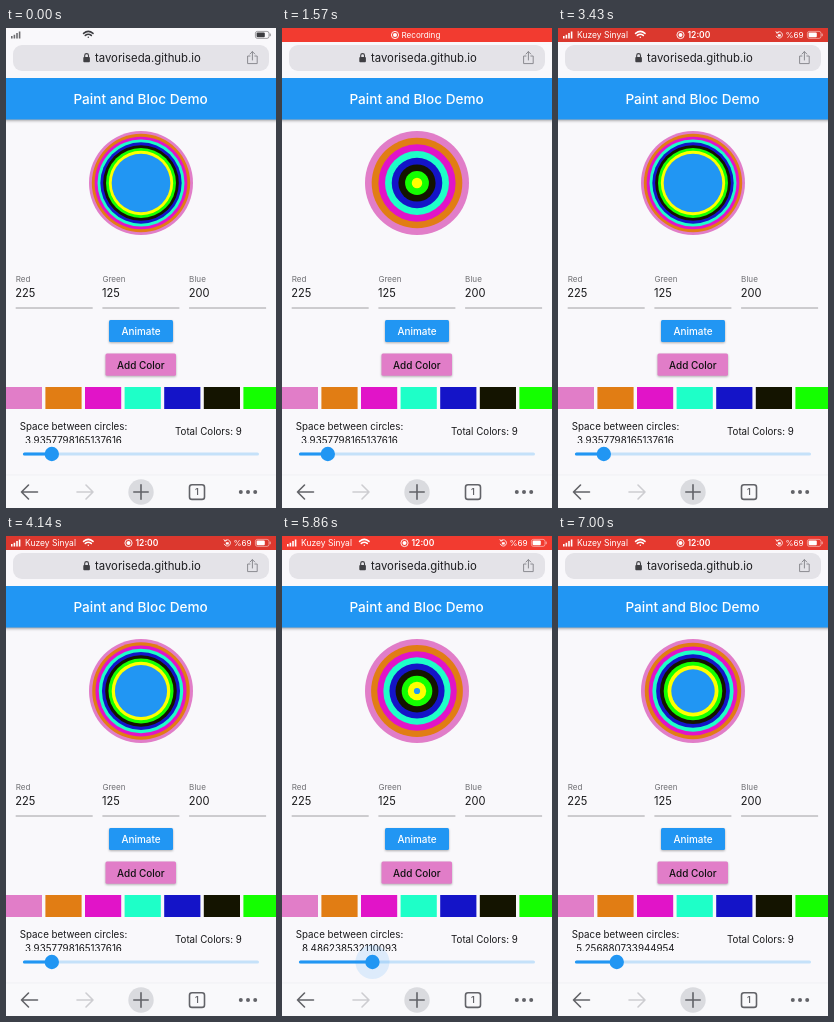
An HTML page that plays this animation: 270x480 px, repeating every 7.14 s.

```html
<!DOCTYPE html>
<html lang="en">
<head>
<meta charset="utf-8">
<title>Paint and Bloc Demo</title>
<style>
  html, body { margin: 0; width: 100%; height: 100%; overflow: hidden; background: #f9f8fb; }
  svg { display: block; width: 100%; height: 100%; font-family: Inter, Roboto, sans-serif; }
  .mid { text-anchor: middle; }
  .bold { font-weight: 500; }
  .line { fill: none; stroke-linecap: round; stroke-linejoin: round; }
  .raised { filter: drop-shadow(0 1px 1px rgba(0, 0, 0, .3)); }
</style>
</head>
<body>
<svg viewBox="0 0 270 480">
  <defs>
    <clipPath id="valueClip"><rect y="400" width="135" height="15"/></clipPath>
    <g id="wifi" class="line" stroke="currentColor" stroke-width="1.6" stroke-linecap="butt">
      <path d="M77.6 5.4Q82.3 1.5 87 5.4M79.3 7.4Q82.3 5 85.3 7.4"/>
      <circle cx="82.3" cy="9.3" r=".7" fill="currentColor" stroke="none"/>
    </g>
    <g id="battery">
      <rect x="249.4" y="3.4" width="13.6" height="7" rx="2" fill="none" stroke="currentColor" stroke-width=".8" opacity=".6"/>
      <rect x="250.6" y="4.6" width="8.2" height="4.6" rx="1" fill="currentColor"/>
      <path d="M264.2 5.6v2.6" stroke="currentColor" opacity=".6"/>
    </g>
    <g id="signal" fill="currentColor">
      <path d="M5 8h1.6v2.6H5zM7.6 6.7h1.6v3.9H7.6z"/>
      <path id="weakBars" d="M10.2 5.1h1.6v5.5h-1.6zM12.8 3.5h1.6v7.1h-1.6z"/>
    </g>
    <g id="record">
      <circle r="3.6" fill="none" stroke="#fff" stroke-width=".9"/>
      <circle r="2" fill="#fff"/>
    </g>
  </defs>

  <rect width="270" height="480" fill="#f9f8fb"/>

  <!-- Status bar -->
  <rect id="statusRed" width="270" height="14"/>
  <g id="statusPlain" color="#3c3c40">
    <use href="#signal" opacity=".75"/><use href="#wifi"/><use href="#battery"/>
  </g>
  <g id="statusRecording" fill="#fff">
    <use href="#record" x="113" y="7"/>
    <text x="119.5" y="10" font-size="8.1">Recording</text>
  </g>
  <g id="statusFull" color="#fff" fill="#fff" font-size="8.5">
    <use href="#signal"/><use href="#wifi"/><use href="#battery"/>
    <text x="19" y="10.2">Kuzey Sinyal</text>
    <use href="#record" x="122.5" y="7"/>
    <text x="129.5" y="10.2" font-weight="600">12:00</text>
    <path class="line" d="M219 4.6a3.2 3.2 0 1 1-.7 3.6M218 3.6l.8 1.6 1.6-.6" stroke="#fff" stroke-width=".8"/>
    <rect x="219.8" y="6.2" width="3" height="2.4" rx=".4"/>
    <text x="227.5" y="10.2" font-size="8.2">%69</text>
  </g>

  <!-- Address bar -->
  <rect x="7" y="17" width="256" height="26" rx="9" fill="#e4e3e8"/>
  <rect x="77.3" y="29" width="6.6" height="5.2" rx=".9" fill="#3f3f43"/>
  <path class="line" d="M78.7 29v-1.5a1.9 1.9 0 0 1 3.8 0V29" stroke="#3f3f43" stroke-width="1.1"/>
  <text x="89" y="34" font-size="11.35" fill="#1d1d20">tavoriseda.github.io</text>
  <path class="line" d="M244 28h-2.4v7.6h9.6V28h-2.4M246.4 32v-8.4M244 26l2.4-2.4 2.4 2.4" stroke="#8a8a90" stroke-width="1"/>

  <!-- App bar -->
  <rect x="-4" y="50" width="278" height="41.5" fill="#2196f3" style="filter:drop-shadow(0 1.5px 1.6px rgba(0,0,0,.4))"/>
  <rect y="46" width="270" height="4" fill="#f9f8fb"/>
  <text class="mid bold" x="134.6" y="76" font-size="13.6" fill="#fff">Paint and Bloc Demo</text>

  <g id="rings"></g>
  <g id="fields"></g>

  <!-- Buttons -->
  <g class="mid bold" font-size="9.95">
    <rect class="raised" x="103" y="292" width="64" height="22" rx="1.5" fill="#2196f3"/>
    <text x="135" y="306.7" fill="#fff">Animate</text>
    <rect class="raised" x="99.5" y="325.5" width="70.5" height="22.3" rx="1.5" fill="#e17dc8"/>
    <text x="134.8" y="340.5" fill="#111">Add Color</text>
  </g>

  <g id="swatches"></g>

  <!-- Spacing slider -->
  <g font-size="9.75" fill="#18181a">
    <text class="mid" x="67.5" y="402">Space between circles:</text>
    <g clip-path="url(#valueClip)"><text id="value" class="mid" x="67.5" y="415.8"></text></g>
    <text x="169" y="407.3">Total Colors: 9</text>
  </g>
  <path class="line" d="M18.5 426H251.5" stroke="#c5e1f9" stroke-width="3"/>
  <path id="active" class="line" stroke="#2196f3" stroke-width="3.2"/>
  <circle id="halo" cy="426" r="17" fill="#2196f3"/>
  <circle id="thumb" cy="426" r="7.2" fill="#2196f3"/>

  <!-- Browser toolbar -->
  <rect y="447" width="270" height="33" fill="#f9f9fb"/>
  <path d="M0 447H270" stroke="#ededf0" stroke-width=".7"/>
  <g class="line" stroke="#626368" stroke-width="1.6">
    <path d="M31.5 464H15.5M22.5 457l-7 7 7 7"/>
    <path d="M71 464H87M80 457l7 7-7 7" stroke="#cdcdd1"/>
    <circle cx="135" cy="464" r="12.7" fill="#dadbdf" stroke="none"/>
    <path d="M127.8 464h14.4M135 456.8v14.4"/>
    <rect x="183.5" y="456.8" width="15" height="14.6" rx="2.5"/>
  </g>
  <text class="mid" x="191" y="467.4" font-size="9" font-weight="600" fill="#626368">1</text>
  <g fill="#626368">
    <circle cx="234.8" cy="464" r="2"/><circle cx="242" cy="464" r="2"/><circle cx="249.2" cy="464" r="2"/>
  </g>
</svg>

<script>
const LOOP = 7140, FRAME = LOOP / 50;
const SCALE = 0.72;                    // stage pixels per app pixel
const TRACK = 327, MIN = 1, MAX = 25;  // slider length and range
const COLORS = ['#e17dc8', '#e17d14', '#e114c8', '#1effc8', '#1414c8', '#141400', '#14ff00', '#ffff00', '#2196f3'];
const $ = id => document.getElementById(id);

function add(parent, tag, attrs, text = '') {
  const node = document.createElementNS('http://www.w3.org/2000/svg', tag);
  for (const key in attrs) node.setAttribute(key, attrs[key]);
  node.textContent = text;
  return $(parent).appendChild(node);
}

const rings = COLORS.map(fill => add('rings', 'circle', { cx: 135, cy: 155, fill }));

COLORS.slice(0, 7).forEach((fill, i) =>
  add('swatches', 'rect', { x: i * 39.6 - 0.2, y: 359, width: 36.2, height: 22, fill }));

[['Red', 225], ['Green', 125], ['Blue', 200]].forEach(([label, amount], i) => {
  const x = 9.7 + i * 86.7;
  add('fields', 'text', { x, y: 254, 'font-size': 8.1, fill: '#707074' }, label);
  add('fields', 'text', { x: x - 0.4, y: 268.9, 'font-size': 11.1, fill: '#18181a' }, amount);
  add('fields', 'path', { d: `M${x} 280h77`, stroke: '#88888c', 'stroke-width': 0.8 });
});

// Linear interpolation through [time, value] steps
function track(steps, t) {
  const next = steps.findIndex(([time]) => time > t);
  if (next === 0) return steps[0][1];
  if (next < 0) return steps[steps.length - 1][1];
  const [t0, v0] = steps[next - 1], [t1, v1] = steps[next];
  return v0 + (v1 - v0) * (t - t0) / (t1 - t0);
}

const DRAG_START = 5420, DRAG_END = 6720;
const drag = [[DRAG_START, 40], [5860, 103], [6140, 110], [DRAG_END, 58]];
const halo = [[5400, 0], [5560, 0.13], [DRAG_END, 0.13], [6990, 0]];
const pulses = [140, 3990], HALF = 1430, SPEED = 3.74 / 1000;

function pulse(t) {
  return pulses.reduce((sum, start) =>
    sum + Math.max(0, HALF - Math.abs(t - start - HALF)) * SPEED, 0);
}

function show(id, visible) {
  $(id).style.display = visible ? '' : 'none';
}

function draw(t) {
  const notch = Math.round(track(drag, t));
  const value = notch / TRACK * (MAX - MIN) + MIN;
  const spacing = SCALE * (value + (t < DRAG_START ? pulse(t) : 0));
  rings.forEach((ring, i) => ring.setAttribute('r', Math.max(0, 52 - i * spacing)));

  const x = 17 + notch * SCALE;
  $('value').textContent = value;
  $('active').setAttribute('d', `M18.5 426H${x}`);
  $('thumb').setAttribute('cx', x);
  $('halo').setAttribute('cx', x);
  $('halo').setAttribute('opacity', track(halo, t));

  const red = t >= 425, full = t >= 3425;
  show('statusPlain', !red);
  show('statusRed', red);
  show('statusRecording', red && !full);
  show('statusFull', full);
  const glow = 0.5 + 0.5 * Math.cos((t - 1570) / 4290 * 2 * Math.PI);
  $('statusRed').setAttribute('fill', `rgb(${218 + 24 * glow}, ${56 + 3 * glow}, ${46 + 2 * glow})`);
}

const origin = performance.now();
function tick() {
  const t = (performance.now() - origin) % LOOP;
  draw(Math.floor((t + 5) / FRAME) % 50 * FRAME);
  requestAnimationFrame(tick);
}
tick();
</script>
</body>
</html>
```
